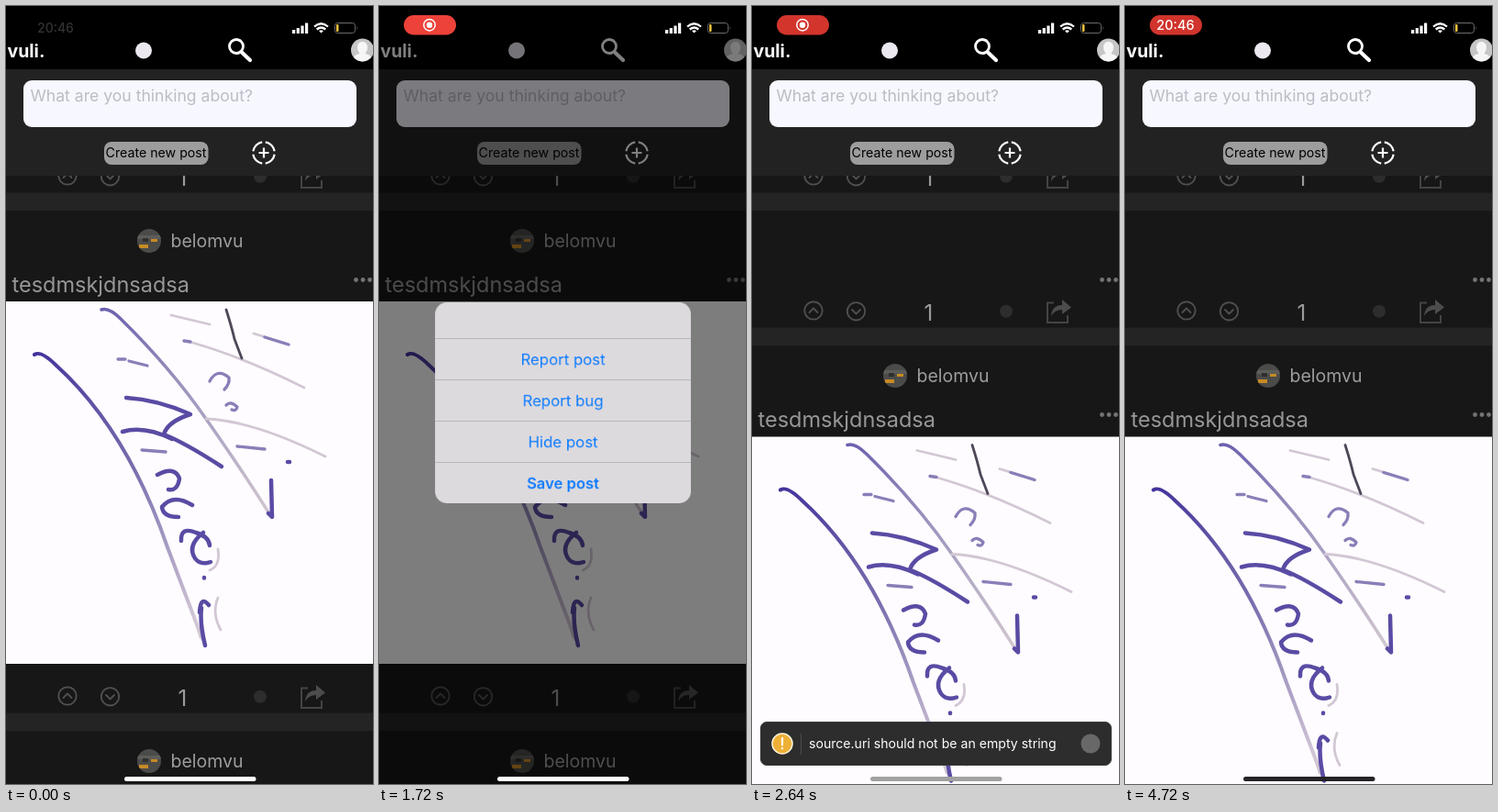
Recreate the animation shown at these times as an HTML page. Size 400 px wide and 848 px high, loop 4.76 s.

```html
<!DOCTYPE html>
<html lang="en">
<head>
<meta charset="utf-8">
<title>Post feed</title>
<style>
  html, body { margin: 0; width: 100%; height: 100%; overflow: hidden; background: #000; }
  svg { display: block; width: 100vw; height: 100vh; font-family: Inter, "Liberation Sans", sans-serif; }
  .line { fill: none; stroke-linecap: round; stroke-linejoin: round; }
  .mid { text-anchor: middle; }

  /* every track shares one 4760 ms clock */
  .before, .after, .toast, .cross, .dim, .alert, .press, .clock, .pill, .tint, .rec, .time, .home {
    animation: 4760ms linear infinite;
  }
  .before { animation-name: before; animation-timing-function: step-end; }
  .after  { animation-name: after;  animation-timing-function: step-end; }
  .toast  { animation-name: toast;  animation-timing-function: step-end; }
  .cross  { animation-name: cross; }
  .dim    { animation-name: dim; }
  .alert  { animation-name: alert; transform-origin: 200.5px 432.5px; }
  .press  { animation-name: press; }
  .clock  { animation-name: clock; }
  .pill   { animation-name: pill; }
  .tint   { animation-name: tint; animation-timing-function: ease-in-out; }
  .rec    { animation-name: rec; }
  .time   { animation-name: time; }
  .home   { animation-name: home; }

  @keyframes before { 0% { visibility: visible } 52.5%, 100% { visibility: hidden } }
  @keyframes after  { 0% { visibility: hidden } 52.5%, 100% { visibility: visible } }
  @keyframes toast  { 0% { visibility: hidden } 53% { visibility: visible } 90%, 100% { visibility: hidden } }
  @keyframes cross  { 0%, 56% { opacity: 0 } 57.5%, 100% { opacity: 1 } }
  @keyframes dim {
    0%, 17.65% { opacity: 0; animation-timing-function: cubic-bezier(.25, .4, .2, 1) }
    26.05%, 44.85% { opacity: .5; animation-timing-function: cubic-bezier(.25, .4, .2, 1) }
    52.4%, 100% { opacity: 0 }
  }
  @keyframes alert {
    0%, 17.65% { opacity: 0; transform: scale(1.2); animation-timing-function: cubic-bezier(.25, .4, .2, 1) }
    26.05%, 44.85% { opacity: 1; transform: none; animation-timing-function: cubic-bezier(.25, .4, .2, 1) }
    52.4%, 100% { opacity: 0; transform: none }
  }
  @keyframes press { 0%, 13.5% { opacity: 1 } 16.5%, 21.2% { opacity: .25 } 26%, 100% { opacity: 1 } }
  @keyframes clock { 0% { opacity: .2 } 1.7%, 100% { opacity: 0 } }
  @keyframes pill  { 0%, .8% { opacity: 0 } 6%, 100% { opacity: 1 } }
  @keyframes tint {
    0% { fill: #f2453d } 23.1% { fill: #d0342c } 41.2% { fill: #f2453d }
    59.2% { fill: #d0342c } 77.3% { fill: #dc3e36 } 95.4%, 100% { fill: #d0342c }
  }
  @keyframes rec  { 0%, 61% { opacity: 1 } 64%, 100% { opacity: 0 } }
  @keyframes time { 0%, 62% { opacity: 0 } 65%, 100% { opacity: 1 } }
  @keyframes home {
    0%, 52.5% { fill: #fff } 55.5% { fill: #a0a0a0 } 72%, 90% { fill: #777 } 95%, 99.9% { fill: #262226 } 100% { fill: #fff }
  }
</style>
</head>
<body>
<svg viewBox="0 0 400 848" preserveAspectRatio="none">
  <defs>
    <linearGradient id="fade" x1="0" y1="0" x2="1" y2="1">
      <stop offset="0" stop-color="#43329c"/>
      <stop offset=".5" stop-color="#7a6fae"/>
      <stop offset="1" stop-color="#dcd0da"/>
    </linearGradient>
    <linearGradient id="pale" x1="0" y1="0" x2="1" y2="1">
      <stop offset="0" stop-color="#6a5fae"/>
      <stop offset=".4" stop-color="#9a90bc"/>
      <stop offset="1" stop-color="#d2c8d0"/>
    </linearGradient>
    <clipPath id="round"><circle cx="156" cy="71" r="13"/></clipPath>

    <!-- feed parts; y = 0 is the middle of an action row -->
    <g id="actions">
      <rect y="-35" width="400" height="53" fill="#171717"/>
      <g class="line" stroke="#505050" stroke-width="1.8">
        <circle cx="67" r="9.7"/><path d="M62.500 2 67-2.500 71.500 2"/>
        <circle cx="113.500" cy=".8" r="9.7"/><path d="M109-1 113.500 3.500 118-1"/>
      </g>
      <text class="mid" x="192.500" y="11" font-size="24" fill="#9a9a9a">1</text>
      <circle cx="277" cy=".8" r="7" fill="#2d2d2d"/>
      <path d="M329-8.500H322V13H344V5" fill="none" stroke="#444" stroke-width="2"/>
      <path d="M326 6Q327-6 338-6V-12L348-3.500 338 4V-1Q330-1 326 6Z" fill="#4c4c4c"/>
    </g>
    <g id="dots" fill="#747474">
      <circle cx="381.500" cy="113.500" r="2.400"/><circle cx="389" cy="113.500" r="2.400"/><circle cx="396.500" cy="113.500" r="2.400"/>
    </g>
    <g id="card">
      <rect y="18.500" width="400" height="20" fill="#242424"/>
      <rect y="38.500" width="400" height="110" fill="#171717"/>
    </g>
    <g id="author">
      <g clip-path="url(#round)">
        <rect x="143" y="58" width="26" height="26" fill="#4b4b49"/>
        <path d="M143 65H169V69H143Z" fill="#5c5c59"/>
        <path d="M145 75H155V79H145ZM158 69H165V72H158Z" fill="#c78a25"/>
        <path d="M149 68H155V72H149Z" fill="#2f2f2f"/>
      </g>
      <text x="179.500" y="78" font-size="19.500" fill="#9e9e9e">belomvu</text>
      <text x="6.500" y="126.500" font-size="23.500" fill="#979797">tesdmskjdnsadsa</text>
    </g>
    <g id="photo" class="line">
      <rect y="137" width="400" height="395" fill="#fefcfe"/>
      <g transform="translate(0 -185)">
        <path d="M31 380Q38 375 55 392 132 462 176 590 195 640 214 690" stroke="url(#fade)" stroke-width="4"/>
        <path d="M104 331Q112 328 125 341 180 395 218 450 260 510 288 555" stroke="url(#pale)" stroke-width="3.500"/>
        <g stroke="#d2c7d4" stroke-width="2.800">
          <path d="M218 450Q270 452 348 491M200 366Q260 383 325 416M180 337 222 347M270 357 306 368"/>
          <path d="M231 645Q224 662 234 680M222 615Q234 610 231 592M205 665 212 688"/>
        </g>
        <g stroke="#8a7eb8" stroke-width="3.300">
          <path d="M122 385H130M134 387 154 392M222 409Q230 394 243 405 244 412 238 418M240 435Q245 430 252 437 251 442 246 440"/>
          <path d="M194 365 201 366M282 361 308 369M252 480 282 483M148 484 174 486"/>
        </g>
        <path d="M240 331Q246 350 249 363L257 384" stroke="#4f4758" stroke-width="2.800"/>
        <g stroke="#5a4ba4" stroke-width="4.500">
          <path d="M131 427Q165 429 201 445 176 453 172 467 195 476 235 502M127 464Q150 457 181 472"/>
          <path d="M165 511Q184 501 189 515 187 529 177 527M203 544Q182 531 170 546 171 557 188 557"/>
          <path d="M191 583Q190 567 207 574 221 578 222 588M215 574Q197 588 206 602 212 610 223 606"/>
          <path d="M211 661Q212 642 221 653M213 656Q211 672 217 697M289 517 290 557 286 553M307 497H309M216 623V623.500"/>
        </g>
      </g>
    </g>
  </defs>

  <rect width="400" height="848" fill="#171717"/>
  <use href="#actions" y="185"/>
  <g class="before">
    <use href="#card" y="185"/>
    <use href="#author" y="185"/>
    <use href="#dots" y="185" class="press"/>
    <use href="#photo" y="185"/>
    <use href="#actions" y="752"/>
    <use href="#card" y="752"/>
    <use href="#author" y="752"/>
  </g>
  <g class="after">
    <use href="#card" y="185"/>
    <use href="#actions" y="332"/>
    <use href="#dots" y="185"/>
    <use href="#card" y="332"/>
    <use href="#author" y="332"/>
    <use href="#dots" y="332"/>
    <use href="#photo" y="332.500"/>
  </g>

  <!-- header -->
  <rect width="400" height="69" fill="#000"/>
  <rect y="69" width="400" height="116" fill="#222"/>
  <text x="1.500" y="56" font-size="19.500" font-weight="700" fill="#fff">vuli.</text>
  <circle cx="150" cy="48.500" r="9" fill="#ebe8f0"/>
  <g class="line" stroke="#fff">
    <circle cx="251" cy="44" r="7.500" stroke-width="2.800"/>
    <path d="M257 50.500 266 59" stroke-width="4.200"/>
  </g>
  <circle cx="388.500" cy="48" r="12.500" fill="#c6c6c6"/>
  <path d="M379 56Q380 53 385.500 52 382.500 48 383 44 384 39 388.500 39 393 39 394 44 394.500 48 391.500 52 397 53 398 56A12.500 12.500 0 0 1 379 56Z" fill="#f6f6f6"/>
  <rect x="19" y="81" width="363" height="51" rx="9" fill="#f7f7ff"/>
  <text x="26.500" y="104" font-size="17.600" fill="#bcbcc6">What are you thinking about?</text>
  <rect x="107" y="148" width="113.500" height="25" rx="8" fill="#9d9d9d"/>
  <text class="mid" x="163.500" y="165" font-size="14.200">Create new post</text>
  <g fill="none" stroke="#fff" stroke-width="2.200">
    <circle cx="281" cy="160" r="11.800" pathLength="80" stroke-dasharray="16 4" stroke-dashoffset="-2"/>
    <path d="M275.500 160H286.500M281 154.500V165.500"/>
  </g>

  <g class="toast">
    <rect x="9.500" y="780.500" width="382" height="47" rx="6.500" fill="#2d2d2d" stroke="#3a3a3a"/>
    <circle cx="33" cy="804" r="11" fill="#eeb036" stroke="#fdf3dc" stroke-width="1.500"/>
    <path d="M33 798V805.500M33 809V809.300" class="line" stroke="#fff" stroke-width="2.200"/>
    <path d="M53.500 793V816" stroke="#4c4c4c"/>
    <text x="62" y="809" font-size="14.100" fill="#fff">source.uri should not be an empty string</text>
    <circle cx="369" cy="804" r="10.500" fill="#686868"/>
    <path class="cross line" d="M365 800 373 808M373 800 365 808" stroke="#2d2d2d" stroke-width="1.500"/>
  </g>

  <rect class="dim" width="400" height="848" opacity="0"/>
  <g class="alert" opacity="0">
    <rect x="61" y="323" width="279" height="219" rx="13" fill="#dddade"/>
    <path d="M61 362.500H340M61 407.500H340M61 452.500H340M61 497.500H340" stroke="#b9b6bb"/>
    <g class="mid" font-size="16.800" fill="#0a7aff">
      <text x="200.500" y="391.500">Report post</text>
      <text x="200.500" y="436.500">Report bug</text>
      <text x="200.500" y="481.500">Hide post</text>
      <text x="200.500" y="526.500" font-weight="600" font-size="16.600">Save post</text>
    </g>
  </g>

  <!-- status bar -->
  <text class="clock" x="34" y="29" font-size="14" font-weight="500" fill="#fff">20:46</text>
  <g class="pill">
    <rect class="tint" x="27" y="10" width="57" height="21.500" rx="10.750"/>
    <g class="rec">
      <circle cx="55" cy="20.700" r="6.200" fill="none" stroke="#fff" stroke-width="1.500"/>
      <circle cx="55" cy="20.700" r="3.200" fill="#fff"/>
    </g>
    <text class="time mid" x="55" y="26" font-size="14.500" font-weight="500" fill="#fff">20:46</text>
  </g>
  <path d="M312 26h3.200v4h-3.200zM316.700 24h3.200v6h-3.200zM321.400 21.500h3.200v8.500h-3.200zM326 18.500h3.200v11.500h-3.200z" fill="#fff"/>
  <g fill="none" stroke="#fff" stroke-width="2.300">
    <path d="M336 22.500Q343.500 16 351 22.500M338.700 25.500Q343.500 21.500 348.300 25.500"/>
    <path d="M343.500 29.500 341 27Q343.500 25.300 346 27Z" fill="#fff" stroke="none"/>
  </g>
  <rect x="358.500" y="18.500" width="22" height="11" rx="3" fill="none" stroke="#6c6c6c"/>
  <path d="M382 22Q383.500 24 382 26Z" fill="#6c6c6c"/>
  <rect x="360" y="20" width="2.500" height="8" rx="1" fill="#f3c33c"/>

  <rect class="home" x="129" y="840" width="143.500" height="5" rx="2.500"/>
</svg>
</body>
</html>
```
